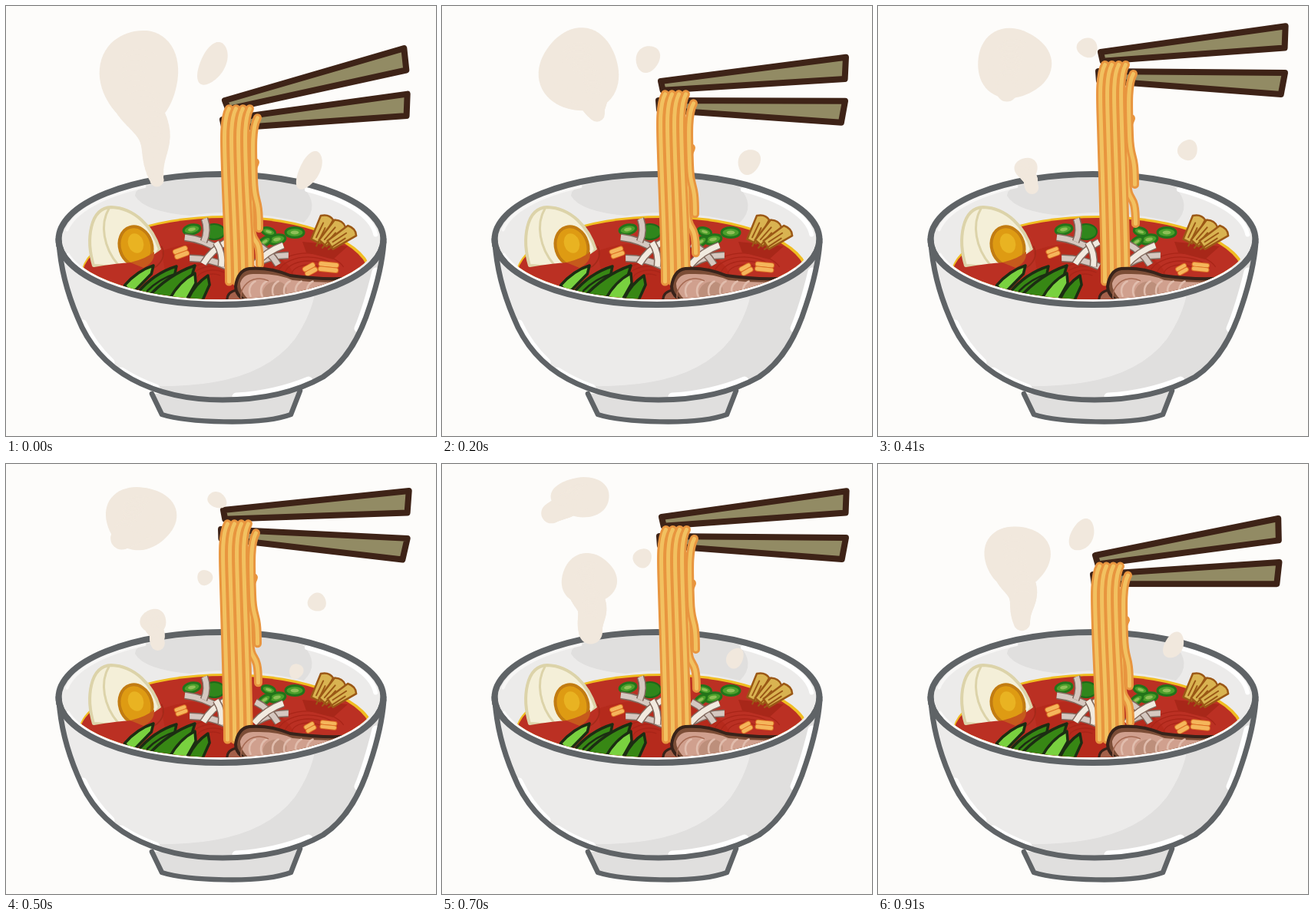
Animation, 560 px wide and 560 px high, one loop 1 s. Source, as an HTML page with a canvas:

```html
<!DOCTYPE html>
<html lang="en">
<head>
<meta charset="utf-8">
<title>Noodle bowl</title>
<style>
html, body { margin: 0; width: 100%; height: 100%; overflow: hidden; background: #fdfcfa; }
canvas { display: block; width: 560px; height: 560px; }
</style>
</head>
<body>
<canvas id="stage" width="560" height="560"></canvas>
<script>
const ctx = document.getElementById('stage').getContext('2d');
const LOOP = 1000;
const starts = [0, 120, 200, 330, 410, 500, 620, 700, 830, 910];
const INK = '#5f6366', PLAIN = '#ecebea', SHADE = '#e0dfde', SOUP = '#bb3023';
const mix = (a, b, t) => a + (b - a) * t;

// Chopsticks going up: tip x, y, upper angle, lower angle
const lift = [
  [285, 123, -16.2, -7.9], [283, 119, -11.4, -3.8], [285, 98, -7.4, .2],
  [286, 69, -8, .5], [290, 60, -8, .5], [283, 60, -5.9, 2.8]
];

// Steam life: step, x, y, rx, ry, then tail x, y, radius
const cloud = [
  [3, 194, 219, 13, 13, 204, 240, 8],
  [5, 192, 205, 17, 16, 198, 235, 9],
  [7, 191, 150, 36, 33, 194, 222, 15],
  [9, 181, 121, 43, 41, 188, 210, 10],
  [10, 174, 92, 51, 62, 198, 232, 8],
  [12, 179, 84, 52, 54, 203, 143, 9],
  [15, 175, 70, 46, 41, 150, 98, 14],
  [17, 181, 43, 38, 26, 141, 65, 13],
  [18, 174, 32, 19, 11, 152, 40, 8]
];
const wisps = [
  [[5, 259, 148, 10, 10], [8, 262, 110, 14, 13], [10, 269, 75, 30, 16], [12, 268, 69, 18, 15], [15, 275, 47, 10, 13]],
  [[5, 378, 270, 10, 9], [9, 385, 236, 18, 12], [10, 395, 214, 27, 13], [12, 400, 203, 17, 14], [15, 405, 180, 12, 12]]
];

function seeded(seed) {
  return () => (seed = seed * 16807 % 2147483647) / 2147483647;
}
function fill(d, color) {
  ctx.fillStyle = color;
  ctx.fill(new Path2D(d));
}
function line(d, color, width) {
  ctx.strokeStyle = color;
  ctx.lineWidth = width;
  ctx.stroke(new Path2D(d));
}
function shape(d, color, ink, width) {
  fill(d, color);
  line(d, ink, width);
}
function strip(d, color, ink, width, edge = 3) {
  line(d, ink, width + edge);
  line(d, color, width);
}
function ellipse(x, y, rx, ry, color, ink, width, turn = 0) {
  ctx.beginPath();
  ctx.ellipse(x, y, rx, ry, turn, 0, 7);
  if (color) { ctx.fillStyle = color; ctx.fill(); }
  if (ink) { ctx.strokeStyle = ink; ctx.lineWidth = width; ctx.stroke(); }
}
function arc(x, y, rx, ry, from, to, color, width) {
  ctx.beginPath();
  ctx.ellipse(x, y, rx, ry, 0, from, to);
  ctx.strokeStyle = color;
  ctx.lineWidth = width;
  ctx.stroke();
}
function placed(x, y, angle, draw) {
  ctx.save();
  ctx.translate(x, y);
  ctx.rotate(angle);
  draw();
  ctx.restore();
}
function inside(draw) {
  ctx.save();
  ctx.beginPath();
  ctx.ellipse(280, 302, 205, 80, 0, 0, 7);
  ctx.clip();
  draw();
  ctx.restore();
}

function keyAt(track, k) {
  const i = track.findIndex(row => row[0] >= k);
  if (i < 0 || k < track[0][0]) return null;
  const b = track[i], a = track[i - 1] || b;
  const t = a === b ? 0 : (k - a[0]) / (b[0] - a[0]);
  return a.map((v, j) => mix(v, b[j], t));
}
function puff([k, x, y, rx, ry, tx, ty, tr], turn) {
  ctx.fillStyle = '#f1e8dd';
  placed(x, y, turn, () => {
    ctx.beginPath();
    for (let a = 0; a < 6.28; a += .1) {
      const r = 1 + .04 * Math.sin(3 * a + k);
      ctx.lineTo(rx * r * Math.cos(a), ry * r * Math.sin(a));
    }
    ctx.fill();
  });
  if (!tr) return;
  const sway = Math.hypot(tx - x, ty - y) * .1;
  for (let t = 0; t <= 1; t += .04) {
    const bend = -Math.sin(8 * t) * (1 - t) * sway;
    const r = mix(Math.min(rx, ry) * .7, tr, t);
    ellipse(mix(x, tx, t) + bend, mix(y, ty, t), r, r, '#f1e8dd');
  }
}
function steam(step) {
  for (const track of [cloud, ...wisps])
    for (const k of [step, step + 10]) {
      const row = keyAt(track, k);
      if (row) puff(row, track === cloud ? 0 : -1.1);
    }
}

const BODY = 'M69 308C71 340 79 372 93 405C106 438 129 467 164 486C199 505 240 513 282 513C330 513 376 504 413 483C446 461 463 425 474 390C484 360 490 335 492 308';

function rim(from, to) {
  arc(280, 304, 211.5, 85, from, to, INK, 8);
}
function bowlBack() {
  shape('M190 505L203 532C235 542 330 547 371 532L383 501', SHADE, INK, 6.5);
  ellipse(280, 304, 211, 85, PLAIN);
  fill('M180 235Q280 206 386 235Q410 260 388 282Q300 262 240 273Q180 268 168 247Q168 239 180 235', SHADE);
  arc(280, 304, 203, 79, 3.3, 4.2, '#f8f7f6', 4);
  arc(280, 304, 202, 78, 5.3, 6.2, '#fff', 6);
}
function bowlFront() {
  const body = new Path2D(BODY);
  body.ellipse(280, 304, 211.5, 85, 0, 0, Math.PI);
  ctx.save();
  ctx.clip(body, 'evenodd');
  fill('M60 300H500V560H60Z', PLAIN);
  fill('M403 370Q398 402 376 434Q342 478 270 490Q235 496 190 495L280 530L480 500L500 320Z', SHADE);
  line('M100 414Q113 442 136 464M150 476Q172 490 195 498M300 509Q350 506 394 488M482 346Q471 391 459 420', '#fff', 11);
  ctx.restore();
  line(BODY, INK, 7);
}

function soup(pose) {
  const rx = 187 + pose * .7;
  ellipse(287, 350, rx + 2, 77, '#f0bd22');
  ellipse(286, 352, rx, 76, SOUP);
  ellipse(270, 355, 105, 47, '#b52a1c');
  for (let i = 0; i < 4; i++) {
    arc(394, 350, 22 + i * 9, 13 + i * 5, 3.3, 5.9, '#a92518', 1.3);
    arc(270, 357, 14 + i * 8, 8 + i * 5, 2.4, 5.4, '#a92518', 1.3);
  }
  const rnd = seeded(7);
  for (let i = 0; i < 9; i++)
    line(`M${(i % 2 ? 432 : 203) + rnd * 0 + rnd() * 18} ${(i % 2 ? 318 : 293) + rnd() * 16}l4 4`, '#9b1d14', 3);
}

function egg() {
  shape('M114 338C104 304 109 263 137 262C168 263 191 288 200 317Q187 341 145 340Z', '#f4efd8', '#dcd3a9', 4);
  line('M134 264C122 284 127 315 146 337', '#dcd3a9', 3);
  ellipse(169, 313, 21, 26, '#de9b13', '#c27c12', 4, -.3);
  ellipse(169, 309, 10, 13, '#e9b322', null, 0, -.3);
  fill('M115 340Q144 335 164 334Q186 330 202 317L208 350H120Z', SOUP);
  fill('M162 334Q183 329 193 320Q194 334 179 341Z', '#c65a1c');
  arc(177, 322, 28, 23, -.4, 1.3, '#a32a1a', 1.6);
}

function scallion(x, y, size, turn = 0) {
  ellipse(x, y, size, size * .55, '#4c9f2b', '#23741a', 3, turn);
  ellipse(x, y, size * .45, size * .2, '#8fbf57', null, 0, turn);
}
function sprout(x, y, length, angle, color) {
  placed(x, y, angle, () => strip(`M${-length / 2} 2Q0 -4 ${length / 2} 2`, color, '#82695d', 7));
}
function toppings(pose) {
  ellipse(271, 294, 14, 10, '#2f861c', '#1f6918', 2);
  scallion(242, 291, 11, -.2);
  scallion(342, 294, 9, .3);
  scallion(353, 304, 11, -.2);
  scallion(337, 307, 9, -.6);
  scallion(376, 295, 12);

  const pale = '#f1eadf', grey = '#d5c8c0';
  ctx.lineCap = 'butt';
  sprout(257, 308, 50, .35, grey);
  sprout(260, 292, 30, 1.6, grey);
  sprout(264, 332, 50, .22, grey);
  sprout(271, 320, 42, -.75, pale);
  sprout(279, 323, 32, 1.35, pale);
  sprout(347, 328, 42, -.25, grey);
  sprout(341, 322, 40, .75, grey);
  sprout(341, 323, 46, -.6, pale);
  ctx.lineCap = 'round';

  const s = 1.1 - pose * .04;
  for (const [x, y, w, turn] of [[228, 321, 6, -.35], [396, 343, 5, -.5], [420, 340, 9, .1]])
    placed(x, y, turn, () => {
      for (const side of [-3, 3])
        strip(`M${-w * s} ${side * s}H${w * s}`, '#f5b65b', '#dd7226', 5 * s, 2);
    });

  fill('M386 307L445 313L426 330L391 321Z', '#a82719');
  for (let i = 0; i < 3; i++)
    placed(405 + i * 10, 304 + i * 3, -1.12 + i * .27, () => {
      shape('M-3 -7L30 -9Q37 0 32 8L-3 6Z', '#d9b351', '#9b5816', 2.5);
      line('M2 -2H23M-8 3H18', '#9b5816', 2);
    });
}

function leaf(x, y, tx, ty, width, color) {
  const length = Math.hypot(tx - x, ty - y);
  placed(x, y, Math.atan2(ty - y, tx - x), () =>
    shape(`M0 ${-width * .6}Q${length * .55} ${-width} ${length} 0L${length * .8} ${width * .7}L0 ${width}Z`, color, '#1c2d13', 3.5));
}
function greens() {
  const dark = '#378714', light = '#79d13f';
  leaf(158, 368, 192, 338, 9, light);
  leaf(176, 380, 222, 339, 13, dark);
  leaf(188, 388, 246, 338, 14, dark);
  leaf(240, 392, 263, 351, 11, dark);
  leaf(217, 390, 246, 348, 12, light);
  line('M184 371Q200 355 220 349', '#1c2d13', 2.5);
}

function meat() {
  const edge = '#38231a';
  shape('M288 387Q286 372 301 370L319 387Z', '#a4604a', edge, 3);
  shape('M319 388Q299 379 299 365Q302 344 317 342Q344 340 370 351Q406 356 437 355L440 390Z', '#7c4d36', edge, 4);
  fill('M322 388Q304 373 305 361Q309 348 324 349Q354 348 373 357Q405 361 437 359V390Z', '#d0a08e');
  ellipse(350, 372, 16, 13, '#bd8f7b', null, 0, -.4);
  for (let i = 0; i < 6; i++)
    arc(328 + i * 15, 371, 11, 13, 2.6, 4.4, '#e1bdad', 2.5);
  arc(330, 378, 24, 23, 3, 5.2, '#a66a53', 1.5);
}

function stick(x, y, degrees) {
  placed(x, y, degrees * Math.PI / 180, () =>
    shape('M0 0H243L238 28L1 12Z', '#928b64', '#3e2317', 8));
}

function noodles(left, top) {
  const strand = (x, y, bx, by) => strip(
    `M${x + 6} ${y + 5}C${x - 2} ${y + 20} ${x} ${y + 50} ${x + 1} ${y + 85}S${bx} ${by - 45} ${bx} ${by}`,
    '#f2c160', '#e8953f', 5, 6);
  strand(left + 39, top + 70, left + 51, Math.min(top + 212, 337));
  strand(left + 42, top + 12, left + 50, top + 161);
  for (let i = 3; i >= 0; i--)
    strand(left + 5 + i * 9, top, left + 11 + i * 9.2, 359 - (i > 2 ? 12 : 0));
}

function draw(step) {
  const pose = step > 5 ? 10 - step : step;
  const [x, y, upper, lower] = lift[pose];
  ctx.lineCap = ctx.lineJoin = 'round';
  ctx.fillStyle = '#fdfcfa';
  ctx.fillRect(0, 0, 560, 560);
  bowlBack();
  inside(() => {
    soup(pose);
    egg();
    toppings(pose);
    greens();
  });
  rim(0, 7);
  stick(x - 3, y + 25, lower);
  stick(x, y, upper);
  noodles(x - 5.5, y + 17 + upper * .7);
  inside(meat);
  bowlFront();
  arc(280, 304, 205, 80, .5, 2.9, '#fbfafa', 3);
  rim(0, Math.PI);
  steam(step);
}

function tick() {
  const t = performance.now() % LOOP;
  draw(starts.filter(s => s <= t).length - 1);
  requestAnimationFrame(tick);
}
tick();
</script>
</body>
</html>
```
